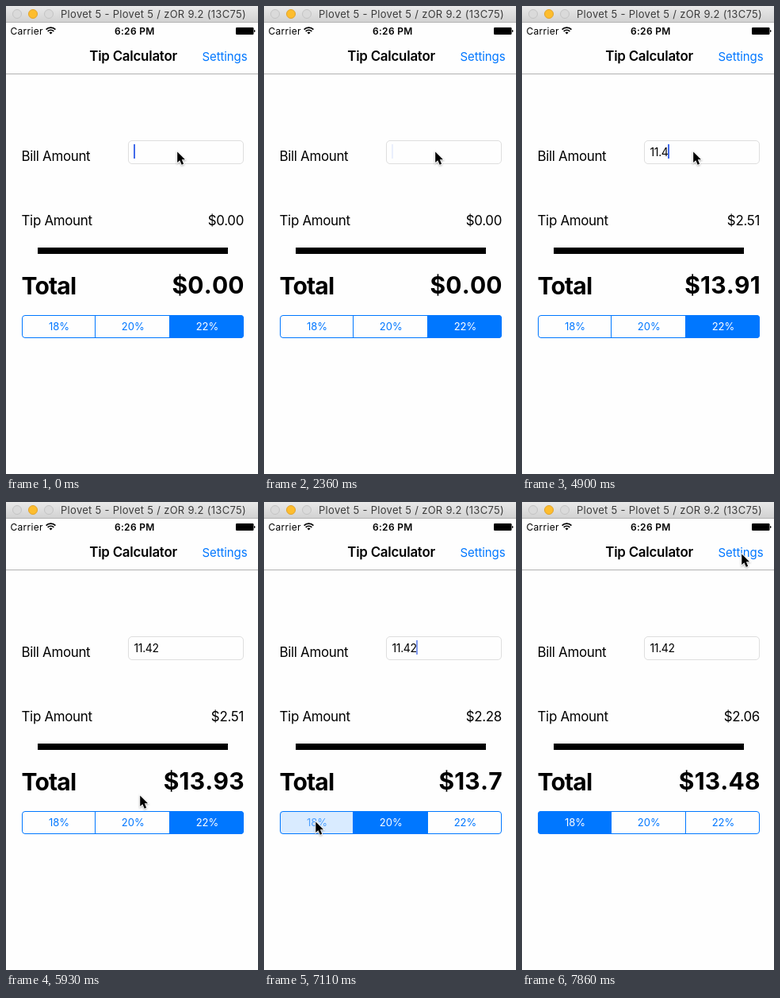
Recreate the animation shown at these times as an HTML page. Size 318x589 px, loop 8 s.

```html
<!DOCTYPE html>
<html lang="en">
<head>
<meta charset="utf-8">
<title>Tip Calculator</title>
<style>
  html, body { margin: 0; width: 100%; height: 100%; overflow: hidden; background: #fefefe; }
  svg { display: block; width: 318px; height: 589px; font-family: Inter, Roboto, sans-serif; }
  .window { font-size: 13px; letter-spacing: .29px; fill: #3c3c3c; }
  .status { font-size: 12px; letter-spacing: .3px; }
  .label { font-size: 16.9px; letter-spacing: -.3px; }
  .strong { font-weight: 600; }
  .title { letter-spacing: -.24px; }
  .link { font-size: 15px; letter-spacing: -.1px; fill: #0077ff; }
  .field { font-size: 14px; letter-spacing: -.35px; }
  .total { font-size: 30px; font-weight: 700; letter-spacing: -.8px; }
  .sum { letter-spacing: .2px; font-kerning: none; }
  .mid { text-anchor: middle; }
  .end { text-anchor: end; }
  .seg { font-size: 13px; }
  .seg rect { fill: #fefefe; }
  .seg text { fill: #0077ff; }
  .seg.pressed rect { fill: #d9ebff; }
  .seg.pressed text { opacity: .65; }
  .seg.on rect { fill: #0077ff; }
  .seg.on text { fill: #fff; }
</style>
</head>
<body>
<svg viewBox="0 0 318 589">
  <defs>
    <linearGradient id="bar" x2="0" y2="1">
      <stop stop-color="#e9e9e9"/>
      <stop offset="1" stop-color="#d2d2d2"/>
    </linearGradient>
    <clipPath id="round"><rect x="20" y="389" width="280" height="29" rx="4"/></clipPath>
  </defs>

  <rect width="318" height="589" fill="#fefefe"/>

  <!-- Window title bar -->
  <rect width="318" height="20" fill="url(#bar)"/>
  <rect y="20" width="318" height="1" fill="#b4b4b4"/>
  <g fill="#dadada" stroke="#c4c4c4">
    <circle cx="14" cy="10" r="5.5"/>
    <circle cx="34" cy="10" r="5.5" fill="#fdbd2e" stroke="#e2a32a"/>
    <circle cx="54" cy="10" r="5.5"/>
  </g>
  <text class="window mid" x="186" y="15">Plovet 5 - Plovet 5 / zOR 9.2 (13C75)</text>

  <!-- Status bar -->
  <text class="status" x="5.5" y="35.5">Carrier</text>
  <g fill="none" stroke="#000" stroke-width="1.7">
    <path d="M50.6 29.6a8.2 8.2 0 0 1 11.8 0M52.7 31.9a5.2 5.2 0 0 1 7.6 0"/>
    <path d="M56.5 35.6l-2-2.2a2.9 2.9 0 0 1 4 0z" fill="#000" stroke="none"/>
  </g>
  <text class="status strong mid" x="162.3" y="35.5">6:26 PM</text>
  <rect x="290" y="27" width="22.5" height="9" rx="1.2"/>
  <path d="M313 30q1.5 .2 1.5 1.5t-1.5 1.5z"/>

  <!-- Navigation bar -->
  <text class="label strong title mid" x="160.6" y="69">Tip Calculator</text>
  <text class="link end" x="304.5" y="68.5">Settings</text>
  <rect y="85" width="318" height="1" fill="#b2b2b2"/>

  <!-- Form -->
  <text class="label" x="19.5" y="194.5">Bill Amount</text>
  <rect x="154.5" y="169.5" width="145" height="29" rx="4.5" fill="#fefefe" stroke="#dedede"/>
  <text class="field" id="bill" x="161.5" y="189"></text>
  <rect id="caret" y="174" width="2" height="18" fill="#426bea"/>
  <text class="label" x="19.5" y="275.5">Tip Amount</text>
  <text class="label end" id="tip" x="300" y="275.5"></text>
  <rect x="40" y="304" width="240" height="8"/>
  <text class="total" x="19.5" y="362.5">Total</text>
  <text class="total sum end" id="total" x="300.8" y="361.5"></text>

  <!-- Rate picker -->
  <g clip-path="url(#round)">
    <g class="seg mid" data-rate="18"><rect x="20" y="389" width="93" height="29"/><text x="67" y="408">18%</text></g>
    <g class="seg mid" data-rate="20"><rect x="113" y="389" width="93" height="29"/><text x="160.3" y="408">20%</text></g>
    <g class="seg mid" data-rate="22"><rect x="206" y="389" width="94" height="29"/><text x="254" y="408">22%</text></g>
  </g>
  <path d="M112.5 389v29M206.5 389v29" stroke="#0077ff"/>
  <rect x="20.5" y="389.5" width="279" height="28" rx="3.5" fill="none" stroke="#0077ff"/>

  <path id="pointer" d="M0 0V13.6L3.1 10.7L5.5 16.2L7.9 15.2L5.6 9.8H9.8Z"
        stroke="#fff" stroke-width="1.6" paint-order="stroke"
        style="filter: drop-shadow(0 1px 1px rgba(0,0,0,.3))"/>
</svg>
<script>
const LOOP = 8000, STEP = 147.4, BLINK = 1010, PRESS = 155;
const BILL = '11.42';
const keys = [3400, 3700, 4450, 4900, 5050];
const taps = [6520, 7260];
const home = [216.2, 183.5];
const legs = [
  { from: 5150, to: 6145, goal: [160.5, 404] },
  { from: 6520, to: 7050, goal: [65.3, 402.5] },
  { from: 7260, to: 7800, goal: [277.3, 65.5] }
];

const $ = id => document.getElementById(id);
const segs = document.querySelectorAll('.seg');
const clamp = v => Math.min(1, Math.max(0, v));
const ease = v => (v = clamp(v), v * v * (3 - 2 * v));
const past = (times, t) => times.filter(time => time <= t).length;

// The pointer eases from one stop to the next.
const pointerAt = t => legs.reduce((pos, { from, to, goal }) => {
  const k = ease((t - from) / (to - from));
  return pos.map((v, i) => v + (goal[i] - v) * k);
}, home);

// The caret stays solid for a moment after a key, then pulses.
function caretAt(t, lastKey) {
  const since = Math.max(0, t - lastKey - 230);
  return clamp(.5 + Math.cos(2 * Math.PI * since / BLINK));
}

function draw(t) {
  const held = Math.floor(t / STEP) * STEP;
  const typed = past(keys, t);
  const bill = BILL.slice(0, typed);
  const rate = 22 - 2 * past(taps, t);
  const pressed = 22 - 2 * past(taps, t + PRESS);
  const tip = bill * rate / 100, total = +bill + tip;

  $('bill').textContent = bill;
  $('tip').textContent = '$' + tip.toFixed(2);
  $('total').textContent = '$' + (total ? +total.toFixed(2) : '0.00');
  $('caret').setAttribute('x', Math.round(161 + (bill && $('bill').getComputedTextLength())));
  $('caret').setAttribute('opacity', caretAt(held, typed ? keys[typed - 1] : -210));
  $('pointer').setAttribute('transform', `translate(${pointerAt(held)})`);
  for (const seg of segs) {
    const own = +seg.dataset.rate;
    seg.classList.toggle('on', own === rate);
    seg.classList.toggle('pressed', own === pressed && own !== rate);
  }
}

const begin = performance.now();
function tick() {
  draw((performance.now() - begin) % LOOP);
  requestAnimationFrame(tick);
}
tick();
</script>
</body>
</html>
```
